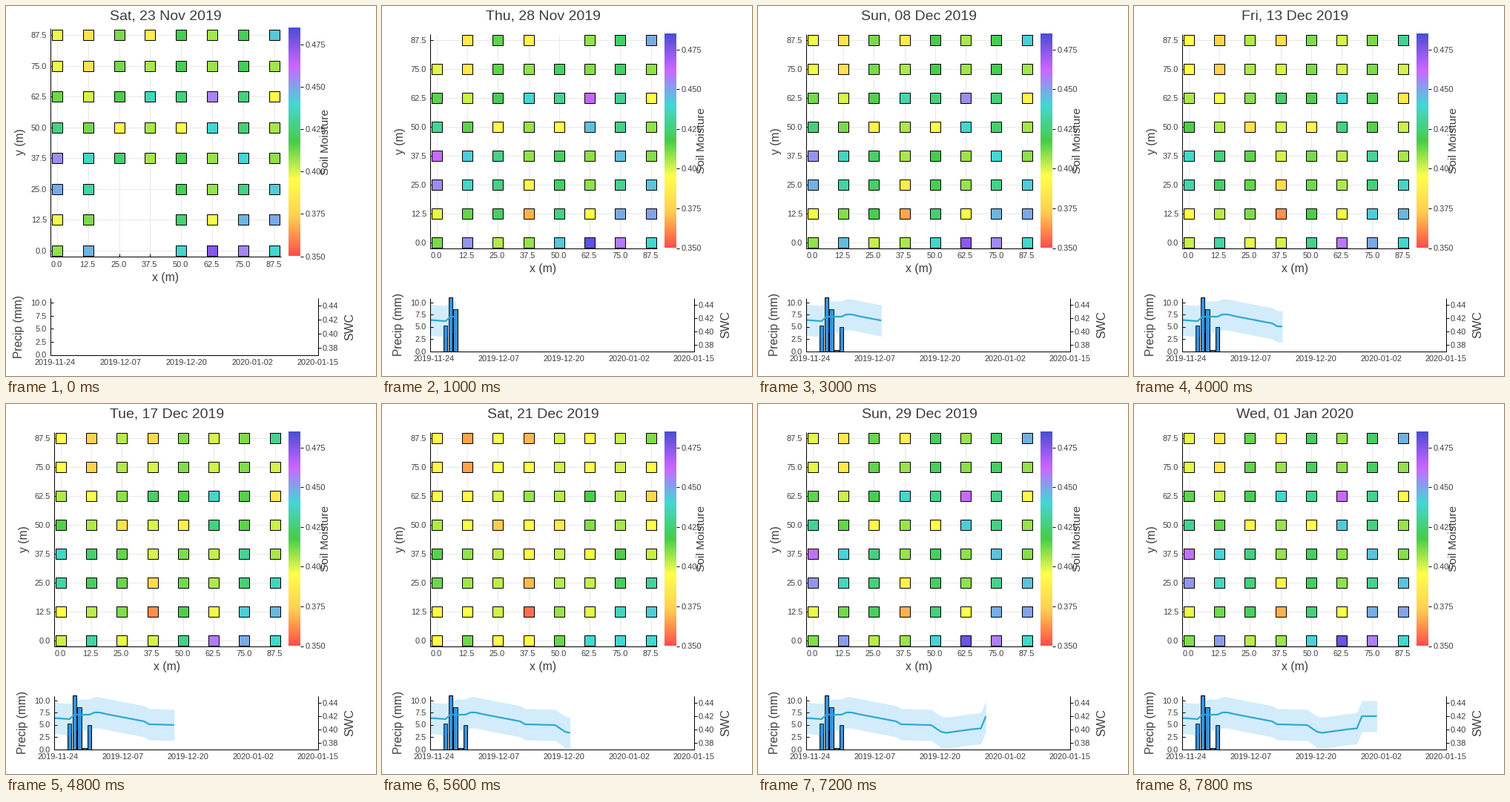
A matplotlib script for the animation above (8000 ms loop, 499 by 499 pixels).

```python
import numpy as np
import matplotlib.pyplot as plt
from matplotlib.animation import FuncAnimation
from matplotlib.colors import LinearSegmentedColormap
from matplotlib.patches import Rectangle

SIZE = 499
DAYS = 40
PX = 0.72  # points per pixel at 100 dpi
RIGHT, LOW_RIGHT, LOW_TOP = 371.5, 421.5, 394
INK = "#3c3c3c"

plt.rcParams["font.family"] = "Liberation Sans"
rainbow = LinearSegmentedColormap.from_list(
    "moisture",
    ["#ff4d4d", "#ffd04d", "#ffff4a", "#48cc4c", "#42d8d4", "#cc66ff", "#4d4ddb"])

# Mean soil water: day and height on the stage
MEAN = [(0, 423.5), (3, 425), (4, 419), (7, 419), (8, 416), (9, 416), (11, 419),
        (18, 428), (19, 432), (25, 433), (27, 442), (28, 443.5), (33, 438.8),
        (35, 437.5), (36, 421), (39, 421)]
RAIN = {3: 5.3, 4: 11, 5: 8.6, 6: 0.3, 7: 4.9}

# Broad patches (row from the top, column, radius, change) and single spots
PATCHES = [(0.5, 0.5, 1.3, -14), (4.4, 0.4, 1.1, 23), (2.4, 5, 0.7, 34),
           (6.3, 6.9, 1.1, 20), (7, 5, 0.9, 32)]
WET_SPOTS = [(0, 7, 18), (2, 3, 14), (4, 6, 10), (5, 7, 11), (7, 1, 20)]
DRY_SPOTS = [(0, 3, -8), (2, 7, -7), (3, 2, -14), (3, 4, -14), (5, 3, -8),
             (6, 0, -13), (6, 3, -18), (6, 5, -16), (7, 0, -5), (7, 2, -8)]

FIRST = dict(left=60.5, top=30, bottom=337.5, x0=68.9, dx=41.85, y0=329.8,
             dy=41.55, base=470.5, rain=7.05, swc=403.8, swc_step=19.2,
             date0=66.3, date_step=88.6)
REST = dict(left=65.5, top=38, bottom=326.5, x0=73.7, dx=41.28, y0=318.8,
            dy=39.03, base=465.5, rain=6.6, swc=403.3, swc_step=18,
            date0=70.3, date_step=87.6)
DATES = ["2019-11-24", "2019-12-07", "2019-12-20", "2020-01-02", "2020-01-15"]

rows, cols = np.mgrid[0:8, 0:8]


def bump(row, col, radius, change):
    dist2 = (rows - row) ** 2 + (cols - col) ** 2
    return change * np.exp(-dist2 / radius ** 2)


# Readings on the colour scale 0..60; the lower right corner stays moist
wet = 29 + 3.0 * (-1) ** cols + sum(bump(*p) for p in PATCHES)
wet = wet + sum(bump(r, c, 0.5, v) for r, c, v in WET_SPOTS + DRY_SPOTS)
dry = np.interp(wet, [8, 18, 21, 27, 33, 48, 58], [2, 8, 18, 19, 23, 28, 33])
dry = dry + bump(6.5, 7, 2.2, 15)

fig = plt.figure(figsize=(4.99, 4.99), dpi=100, facecolor="white")
ax = fig.add_axes([0, 0, 1, 1])


def mean_y(day):
    return np.interp(day, *zip(*MEAN))


def readings(day):
    dryness = np.clip((mean_y(day) - 420) / 24, 0, 1)
    return wet + dryness * (dry - wet)


def line(xs, ys, color="black", width=1.0, z=3):
    ax.plot(xs, ys, color=color, lw=width * PX, zorder=z, solid_capstyle="butt")


def text(x, y, s, size=11, ha="center", va="center_baseline", rot=0):
    ax.text(x, y, s, fontsize=size * PX, ha=ha, va=va, rotation=rot,
            color=INK, zorder=6)


def side_text(x, y, s, size=15.6):
    text(x, y, s, size, va="center", rot=90)


def box(x, y, w, h, color, z):
    ax.add_patch(Rectangle((x, y), w, h, fc=color, ec="black", lw=PX, zorder=z))


def date_title(day):
    week = ["Sat", "Sun", "Mon", "Tue", "Wed", "Thu", "Fri"][day % 7]
    n = 23 + day
    if n <= 30:
        rest = f"{n:02d} Nov 2019"
    elif n <= 61:
        rest = f"{n - 30:02d} Dec 2019"
    else:
        rest = f"{n - 61:02d} Jan 2020"
    return f"{week}, {rest}"


def missing(day, row, col):
    if day == 0:
        return row >= 5 and col in (2, 3)
    return day == 5 and row == 0 and col in (0, 4)


def draw_map(day, p):
    left, top, bottom = p["left"], p["top"], p["bottom"]
    mid_x, mid_y = (left + RIGHT) / 2, (top + bottom) / 2
    for i in range(8):
        x, y = p["x0"] + i * p["dx"], p["y0"] - i * p["dy"]
        line([x, x], [top, bottom], "#e8e8e8", z=1)
        line([left, RIGHT], [y, y], "#e8e8e8", z=1)
        line([x, x], [bottom - 4, bottom])
        line([left, left + 4], [y, y])
        text(x - 0.8, bottom + 10, f"{12.5 * i:.1f}")
        text(left - 5.5, y, f"{12.5 * i:.1f}", ha="right")
    line([left, left, RIGHT], [top, bottom, bottom])

    for (row, col), value in np.ndenumerate(readings(day)):
        if not missing(day, row, col):
            x, y = p["x0"] + col * p["dx"], p["y0"] - (7 - row) * p["dy"]
            box(x - 7, y - 7, 14, 14, rainbow(value / 60), 4)

    text(mid_x - 1, 18.6, date_title(day), 19.5, va="baseline")
    text(mid_x - 1.3, bottom + 27, "x (m)", 15.7)
    side_text(left - 41, mid_y - 0.5, "y (m)")

    ax.imshow(np.linspace(1, 0, 256)[:, None], cmap=rainbow, aspect="auto",
              extent=(381, 396.5, bottom, top), zorder=2)
    step = (bottom - top) / 5.39
    for i in range(6):
        y = bottom - i * step
        line([397, 401], [y, y])
        text(403.3, y, f"{0.35 + 0.025 * i:.3f}", ha="left")
    side_text(431, mid_y - 0.5, "Soil Moisture", 15.4)


def draw_series(day, p):
    left, base = p["left"], p["base"]
    per_day = (LOW_RIGHT - left) / 53
    for d, amount in RAIN.items():
        if d <= day:
            height = amount * p["rain"]
            box(left + d * per_day - 2.7, base - height, 5.4, height, "#3c90d8", 2)
    if day:
        days = np.arange(day + 1)
        xs, ys = left + days * per_day, mean_y(days)
        ax.fill_between(xs, ys - 21, np.minimum(ys + 21, base),
                        color="#1ea0ee", alpha=0.2, lw=0, zorder=2.5)
        line(xs, ys, "#2fa6d2", 2.2, 3)

    line([left, left, LOW_RIGHT, LOW_RIGHT],
         [LOW_TOP, base, base, LOW_TOP], z=4)
    for i in range(5):
        y = base - 2.5 * i * p["rain"]
        line([left, left + 4], [y, y], z=4)
        text(left - 5.5, y, f"{2.5 * i:.1f}", ha="right")
        text(p["date0"] + i * p["date_step"], base + 9.2, DATES[i])
    for i in range(4):
        y = p["swc"] + i * p["swc_step"]
        line([LOW_RIGHT, LOW_RIGHT + 4], [y, y], z=4)
        text(426.3, y, f"{0.44 - 0.02 * i:.2f}", ha="left")
    mid = (LOW_TOP + base) / 2
    side_text(left - 43, mid, "Precip (mm)")
    side_text(463.5, mid, "SWC", 15.9)


def draw(day):
    ax.clear()
    p = REST if day else FIRST
    draw_map(day, p)
    draw_series(day, p)
    ax.set_xlim(0, SIZE)
    ax.set_ylim(SIZE, 0)
    ax.axis("off")
    return []


anim = FuncAnimation(fig, draw, frames=DAYS, interval=200, repeat=True,
                     repeat_delay=0, init_func=lambda: [])
plt.show()
```
